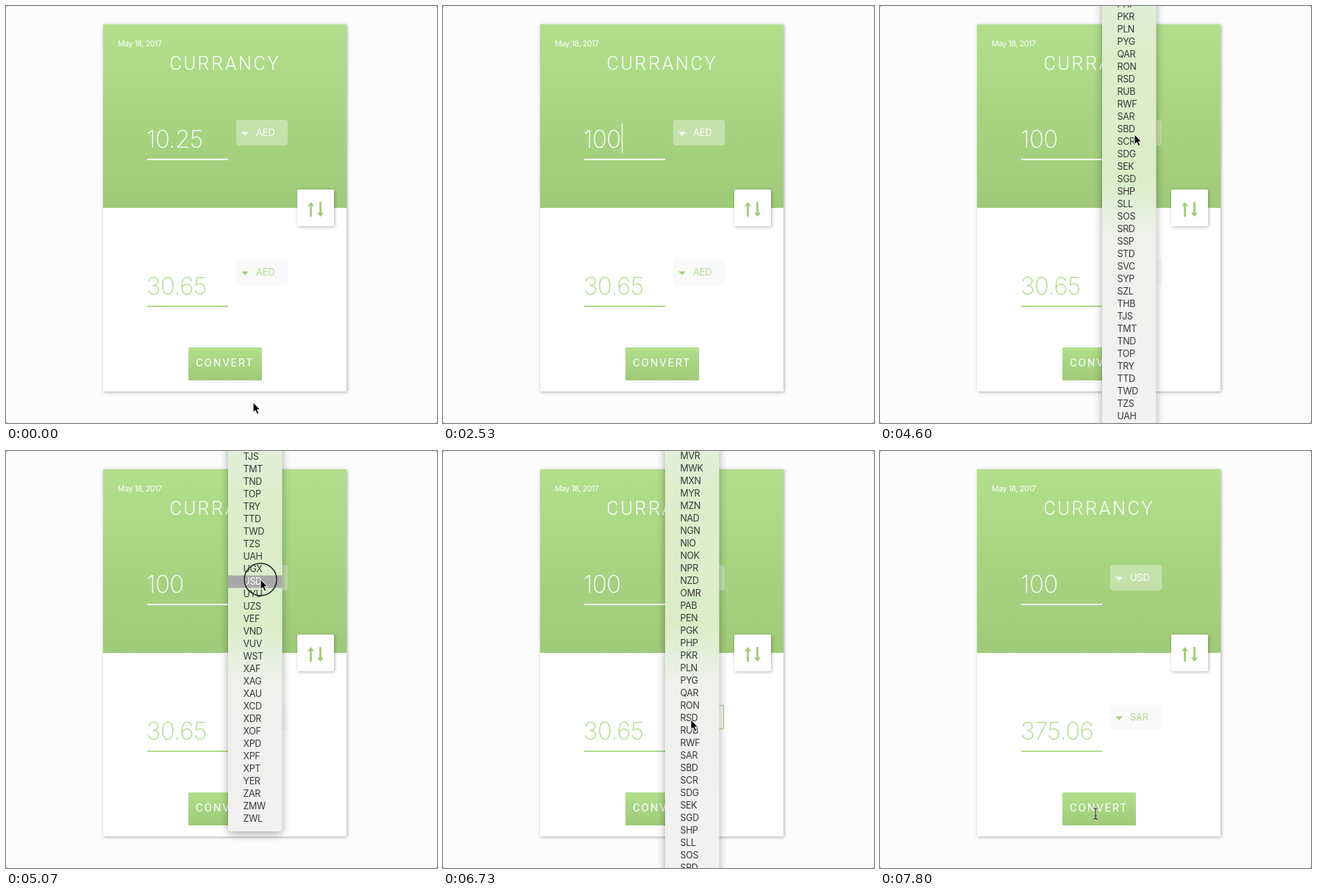
An HTML page that plays this animation: 586 by 568 pixels, repeating every 8000 ms.

```html
<!DOCTYPE html>
<html lang="en">
<head>
<meta charset="utf-8">
<title>Currency converter</title>
<style>
  html, body { margin: 0; width: 100%; height: 100%; overflow: hidden; background: #555; }
  svg { display: block; width: 586px; height: 568px; background: #fcfcfc; border-radius: 2px; }
  text { font-family: Inter, "Liberation Sans", sans-serif; white-space: pre; }
  .card { filter: drop-shadow(1px 1px 2px rgba(0, 0, 0, .32)); }
  .swap { filter: drop-shadow(1px 1px 2px rgba(0, 0, 0, .3)); }
  .date { font-size: 10.5px; letter-spacing: -.35px; }
  .title { font: 300 25px Roboto, sans-serif; letter-spacing: 2.7px; }
  .button { font: 400 15px Roboto, sans-serif; letter-spacing: 1.8px; }
  .amount { font-size: 33px; font-weight: 200; letter-spacing: -.6px; }
  .code { font-size: 13px; letter-spacing: -.3px; }
  .white { fill: #fff; }
  .green { fill: #b2dc8d; }
  #rows { font-size: 12.5px; letter-spacing: -.35px; fill: #383838; }
  #panel { filter: drop-shadow(0 3px 6px rgba(0, 0, 0, .35)); }
</style>
</head>
<body>
<svg viewBox="0 0 586 568">
  <defs>
    <linearGradient id="leaf" x2="0" y2="1">
      <stop stop-color="#b2df8c"/><stop offset="1" stop-color="#9fca79"/>
    </linearGradient>
    <linearGradient id="glass" gradientUnits="userSpaceOnUse" x1="0" x2="0" y1="0" y2="568">
      <stop stop-color="#e3eed8"/><stop offset=".1" stop-color="#dcedcc"/>
      <stop offset=".42" stop-color="#daedc8"/><stop offset=".55" stop-color="#eff1ed"/>
      <stop offset="1" stop-color="#f1f1f1"/>
    </linearGradient>
  </defs>

  <rect class="card" x="132" y="25" width="331" height="500" fill="#fff"/>
  <rect x="132" y="25" width="331" height="250" fill="url(#leaf)"/>
  <g class="white">
    <text class="date" x="152" y="55">May 18, 2017</text>
    <text class="title" x="222.5" y="87">CURRANCY</text>
    <rect id="selection" x="192" y="160" width="78" height="40" opacity=".3"/>
    <text id="amount" class="amount" x="191" y="192.5"></text>
    <rect id="caret" y="160" width="1.2" height="40"/>
    <rect x="192" y="208" width="110" height="2"/>
    <rect x="313" y="155" width="70" height="35" rx="4" opacity=".33"/>
    <path d="M320 171.5h10l-5 5z"/>
    <text id="from" class="code" x="340" y="177.3"></text>
  </g>

  <g class="green">
    <text id="result" class="amount" x="191" y="392.5"></text>
    <rect x="192" y="408" width="110" height="2"/>
    <rect x="313" y="345.5" width="70" height="34.5" rx="4" fill="#f9f9f9"/>
    <rect id="focus" x="314.5" y="346.5" width="67" height="32" fill="#fbfbfb" stroke="#b2dc8d" stroke-width="1.3"/>
    <path d="M320 361.5h10l-5 5z" fill="#a5d07e"/>
    <text id="to" class="code" x="340" y="367.3"></text>
  </g>

  <rect x="248" y="465" width="100" height="45" rx="1.5" fill="url(#leaf)"/>
  <text class="button white" x="258" y="491">CONVERT</text>

  <rect class="swap" x="396" y="250" width="50" height="50" rx="2" fill="#fff"/>
  <path fill="#a0cc79" d="M414.5 267l4.6 5.5h-3.2v14.5h-2.8v-14.5h-3.2zM427.5 287l4.6-5.5h-3.2v-14.5h-2.8v14.5h-3.2z"/>

  <g id="menu">
    <rect id="panel" x="302" width="73.5" rx="4" fill="url(#glass)"/>
    <g id="list">
      <rect id="hover" x="302" width="73.5" height="17" fill="#a8a8aa"/>
      <path id="check" d="M309 .5l2.8 3.5 5-8" fill="none" stroke-width="1.4"/>
      <g id="rows"></g>
    </g>
  </g>

  <g id="pointer">
    <circle id="ring" r="22" fill="none" stroke="#222" stroke-width="1.5"/>
    <path id="arrow" d="M0 0V13.5L3.1 10.7 5.2 15.8 7.7 14.7 5.5 9.8H9.8Z" stroke="#fff" stroke-width="1"/>
    <g id="beam" fill="none">
      <path id="stem" stroke="#fff" stroke-opacity=".6" stroke-width="2.6"
        d="M-3-7.5Q0-7.5 0-5.5Q0-7.5 3-7.5M0-5.5V5.5M-3 7.5Q0 7.5 0 5.5Q0 7.5 3 7.5M-2 3H2"/>
      <use href="#stem"/>
    </g>
  </g>
</svg>
<script>
const LOOP = 8000, ROW = 17;
const codes = `AED AFN ALL AMD ANG AOA ARS AUD AWG AZN BAM BBD BDT BGN BHD BIF BMD BND BOB BRL BSD BTC BTN BWP
BYN BZD CAD CDF CHF CLF CLP CNY COP CRC CUC CUP CVE CZK DJF DKK DOP DZD EGP ERN ETB EUR FJD FKP GBP GEL GGP GHS
GIP GMD GNF GTQ GYD HKD HNL HRK HTG HUF IDR ILS IMP INR IQD IRR ISK JEP JMD JOD JPY KES KGS KHR KMF KPW KRW KWD
KYD KZT LAK LBP LKR LRD LSL LYD MAD MDL MGA MKD MMK MNT MOP MRO MUR MVR MWK MXN MYR MZN NAD NGN NIO NOK NPR NZD
OMR PAB PEN PGK PHP PKR PLN PYG QAR RON RSD RUB RWF SAR SBD SCR SDG SEK SGD SHP SLL SOS SRD SSP STD SVC SYP SZL
THB TJS TMT TND TOP TRY TTD TWD TZS UAH UGX USD UYU UZS VEF VND VUV WST XAF XAG XAU XCD XDR XOF XPD XPF XPT YER
ZAR ZMW ZWL`.split(/\s+/);

const $ = id => document.getElementById(id);
const set = (id, attrs) => { for (const k in attrs) $(id).setAttribute(k, attrs[k]); };
const show = (id, on) => { $(id).style.display = on ? '' : 'none'; };
const put = (id, text) => { if ($(id).textContent !== text) $(id).textContent = text; };
const within = (t, ...spans) => spans.some(([a, b]) => t >= a && t < b);

$('stem').nextElementSibling.remove();
const ink = $('stem').cloneNode();
ink.removeAttribute('id');
ink.setAttribute('stroke', '#333');
ink.setAttribute('stroke-opacity', 1);
ink.setAttribute('stroke-width', 1.2);
$('beam').append(ink);

const rows = codes.map((code, i) => {
  const row = document.createElementNS('http://www.w3.org/2000/svg', 'text');
  row.textContent = code;
  row.setAttribute('x', 322.5);
  row.setAttribute('y', i * ROW + 4.4);
  $('rows').append(row);
  return row;
});

// Eased interpolation through [time, ...values] keys.
function track(keys, t) {
  const next = keys.findIndex(k => k[0] > t);
  if (next === 0) return keys[0].slice(1);
  if (next < 0) return keys[keys.length - 1].slice(1);
  const a = keys[next - 1], b = keys[next];
  const p = (t - a[0]) / (b[0] - a[0]), e = p * p * (3 - 2 * p);
  return a.slice(1).map((v, i) => v + (b[i + 1] - v) * e);
}

// Latest value of [time, value] steps.
const step = (steps, t) => steps.filter(s => s[0] <= t).pop()[1];

// Position of the first row that puts a given code at height y.
const firstRow = (code, y) => y - ROW * codes.indexOf(code);

const pointerPath = [
  [70, 336, 540], [930, 260, 201], [2870, 260, 201], [3280, 346, 177], [3400, 346, 177], [3600, 346, 175],
  [5290, 346, 175], [5950, 337, 366], [7060, 337, 366], [7420, 293, 494]
];
const scrollPath = [
  [3700, 172], [4270, firstRow('PKR', 75)], [4470, firstRow('PKR', 75)], [4600, firstRow('PKR', 15)],
  [5000, firstRow('USD', 178)], [5300, firstRow('USD', 178)], [5301, 362], [6230, 362], [6780, firstRow('SAR', 369)]
];
const amounts = [[0, '10.25'], [1950, '1'], [2130, '10'], [2330, '100']];
const caretX = [[0, 202], [2130, 222], [2330, 243]];
const hovered = [[0, 'AED'], [3730, ''], [5000, 'USD'], [5300, 'AED'], [6260, ''], [6780, 'SAR'], [6930, '']];
const menuAlpha = [[0, 0], [3350, 1], [5200, .5], [5270, 0], [6060, 1], [6880, .5], [6940, .07], [7070, 0]];

function drawMenu(t) {
  const alpha = step(menuAlpha, t);
  show('menu', alpha);
  if (!alpha) return;
  const y = t >= 6940 ? firstRow('LYD', 15) : track(scrollPath, t)[0];
  const top = Math.max(-20, y - 13);
  const active = codes.indexOf(step(hovered, t));
  set('menu', { opacity: alpha });
  set('panel', { y: top, height: Math.min(620, y + codes.length * ROW) - top });
  set('list', { transform: `translate(0 ${y})` });
  set('hover', { y: active * ROW - 8.5 });
  show('hover', active >= 0);
  set('check', { stroke: active === 0 ? '#fff' : '#383838' });
  rows.forEach((row, i) => { row.style.fill = i === active ? '#fff' : ''; });
}

function draw(now) {
  const t = now % LOOP;
  const [x, y] = track(pointerPath, t);
  const beam = within(t, [860, 3000], [7390, LOOP]);

  put('amount', step(amounts, t));
  put('from', t < 5270 ? 'AED' : 'USD');
  put('to', t < 7070 ? 'AED' : 'SAR');
  put('result', t < 7600 ? '30.65' : '375.06');
  show('selection', within(t, [1430, 1950]));
  set('caret', { x: step(caretX, t) });
  show('caret', within(t, [1950, 2870], [3370, 4470]));
  show('focus', within(t, [6040, 7450]));
  drawMenu(t);

  set('pointer', { transform: `translate(${x} ${y})` });
  show('pointer', !within(t, [1950, 2870]));
  show('beam', beam);
  show('arrow', !beam);
  show('ring', within(t, [1130, 1270], [1400, 1540], [3330, 3530], [5070, 5200], [6000, 6140], [6800, 6930], [7470, 7650]));
  requestAnimationFrame(() => draw(performance.now() - start));
}

const start = performance.now();
draw(0);
</script>
</body>
</html>
```
